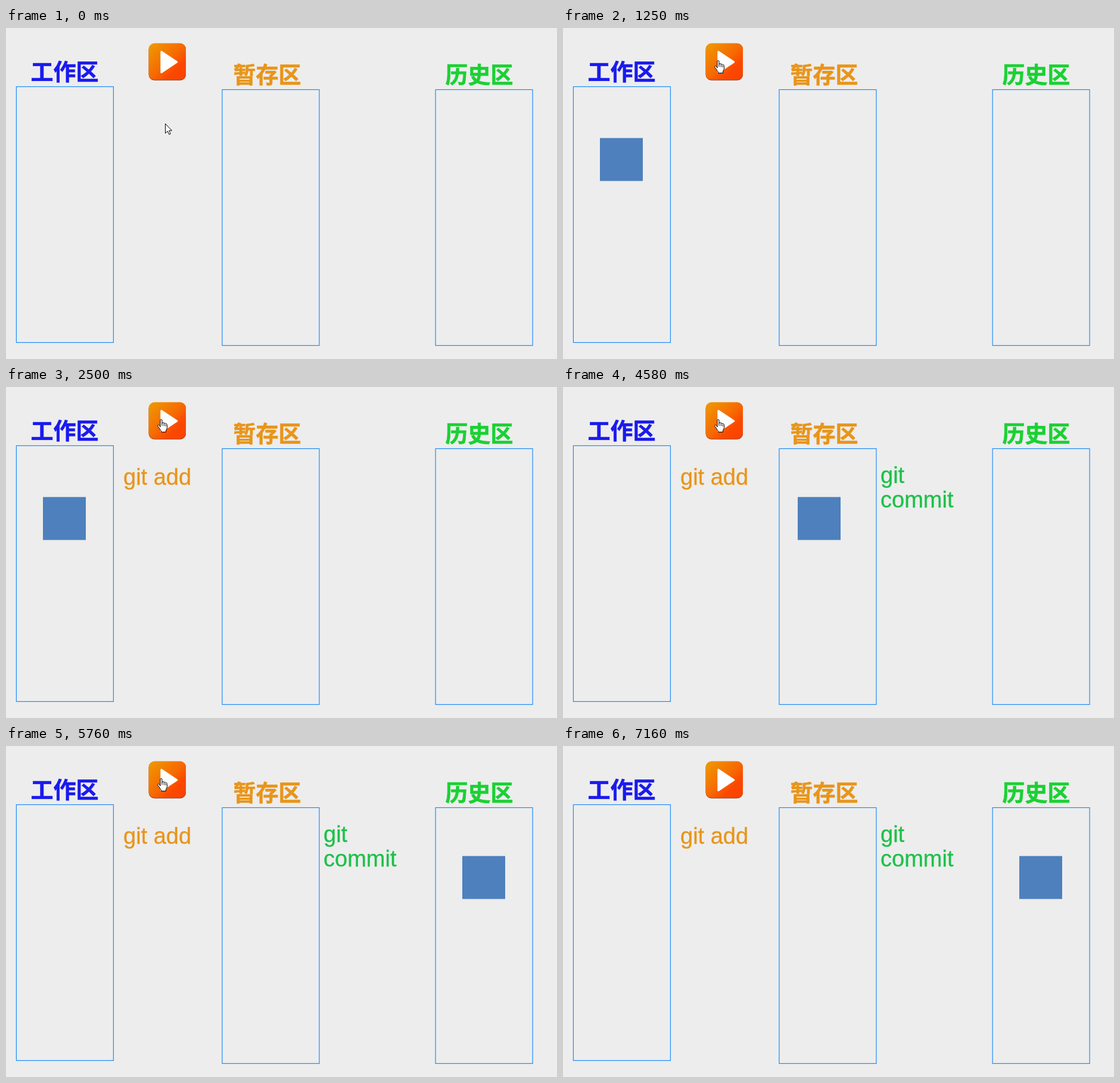
An HTML page that plays this animation: 925x555 px, repeating every 8.02 s.

```html
<!DOCTYPE html>
<html lang="zh-CN">
<head>
<meta charset="utf-8">
<title>Git areas</title>
<style>
  html, body { margin: 0; width: 100%; height: 100%; overflow: hidden; background: #ededed; }
  svg { display: block; }
  .area { fill: none; stroke: #1e8cfa; stroke-width: 1.2; }
  .title { font: 700 38px "Noto Sans CJK SC", "Noto Sans CJK", sans-serif; stroke-width: .6; }
  .cmd { font: 38px "Liberation Sans", Arial, sans-serif; stroke-width: .3; }
  .cursor { fill: #fff; stroke: #000; stroke-width: 1; stroke-linejoin: round; }
  .blue { fill: #1a1aee; stroke: #1a1aee; }
  .orange { fill: #e8951a; stroke: #e8951a; }
  .green { fill: #1ad133; stroke: #1ad133; }
  .teal { fill: #1cc148; stroke: #1cc148; }
</style>
</head>
<body>
<svg width="925" height="555" viewBox="0 0 925 555">
  <defs>
    <linearGradient id="glow" x1="0" y1="0" x2="1" y2="1">
      <stop offset="0" stop-color="#ee9c00"/>
      <stop offset=".5" stop-color="#f66a00"/>
      <stop offset=".72" stop-color="#fb4800"/>
      <stop offset="1" stop-color="#f84200"/>
    </linearGradient>
  </defs>

  <rect class="area" x="17.4" y="98.4" width="163" height="429"/>
  <rect class="area" x="362.9" y="103.4" width="163" height="429"/>
  <rect class="area" x="721.1" y="103.4" width="163" height="429"/>

  <text class="title blue" x="41.5" y="87.2">工作区</text>
  <text class="title orange" x="381.5" y="92.2">暂存区</text>
  <text class="title green" x="737.5" y="92.2">历史区</text>

  <rect x="239.6" y="26.2" width="62.4" height="61.6" rx="9.5" fill="#8c2400"/>
  <rect x="239.6" y="25.6" width="62.4" height="61.4" rx="9.5" fill="url(#glow)"/>
  <path d="M260.8 39.7L286.8 57L260.8 74.4Z" fill="#fff" stroke="#fff" stroke-width="3" stroke-linejoin="round"/>

  <rect id="doc" y="184.5" width="72" height="72" fill="#4d80bd"/>
  <text id="add" class="cmd orange" x="197" y="163.7">git add</text>
  <g id="commit" class="cmd teal">
    <text x="533" y="160.5">git</text>
    <text x="533" y="202.4">commit</text>
  </g>

  <path id="arrow" class="cursor" d="M.5 .5V16.5L4.2 13L6.8 18.5L9.2 17.5L6.7 12H11.5Z"/>
  <path id="hand" class="cursor" d="M5 13V2Q5 .5 6.5 .5T8 2V7Q8.5 5.5 10 5.7T11.3 7.5Q11.6 6.2 12.8 6.5T14.2 8.3Q14.6 7.3 15.6 7.7T16.5 9.5V14Q16.5 16 14.5 18.5V21.5H6.5V19.5Q4.5 17.5 3.3 15L.8 11.8Q.2 10.4 1.3 9.8T3.6 10.8ZM8 7V11M11.3 8V11.5M14.2 9V12"/>
</svg>
<script>
  const LOOP = 8020;
  const el = id => document.getElementById(id);
  const show = (node, on) => node.setAttribute("visibility", on ? "visible" : "hidden");

  // Pointer: start time, shape, left, top
  const pointer = [
    [0, "arrow", 267, 160], [120, "arrow", 266, 160], [280, "arrow", 260, 157],
    [430, "arrow", 238, 135], [550, "arrow", 223, 103], [670, "hand", 244, 66],
    [820, "hand", 250, 59], [950, "hand", 254, 54],
    [6880, "arrow", 410, 190], [7000, "arrow", 556, 327], [7160, "none", 0, 0]
  ];
  // Document: start time, left
  const stops = [[1250, 62], [3580, 394], [5760, 766]];
  const latest = (steps, t) => steps.filter(step => step[0] <= t).pop();

  function draw(t) {
    const [, shape, x, y] = latest(pointer, t);
    for (const id of ["arrow", "hand"]) {
      show(el(id), id === shape);
      el(id).setAttribute("transform", `translate(${x} ${y})`);
    }
    const stop = latest(stops, t);
    show(el("doc"), stop);
    if (stop) el("doc").setAttribute("x", stop[1]);
    show(el("add"), t >= 2500);
    show(el("commit"), t >= 4580);
  }

  const start = performance.now();
  function tick() {
    draw((performance.now() - start) % LOOP);
    requestAnimationFrame(tick);
  }
  tick();
</script>
</body>
</html>
```
